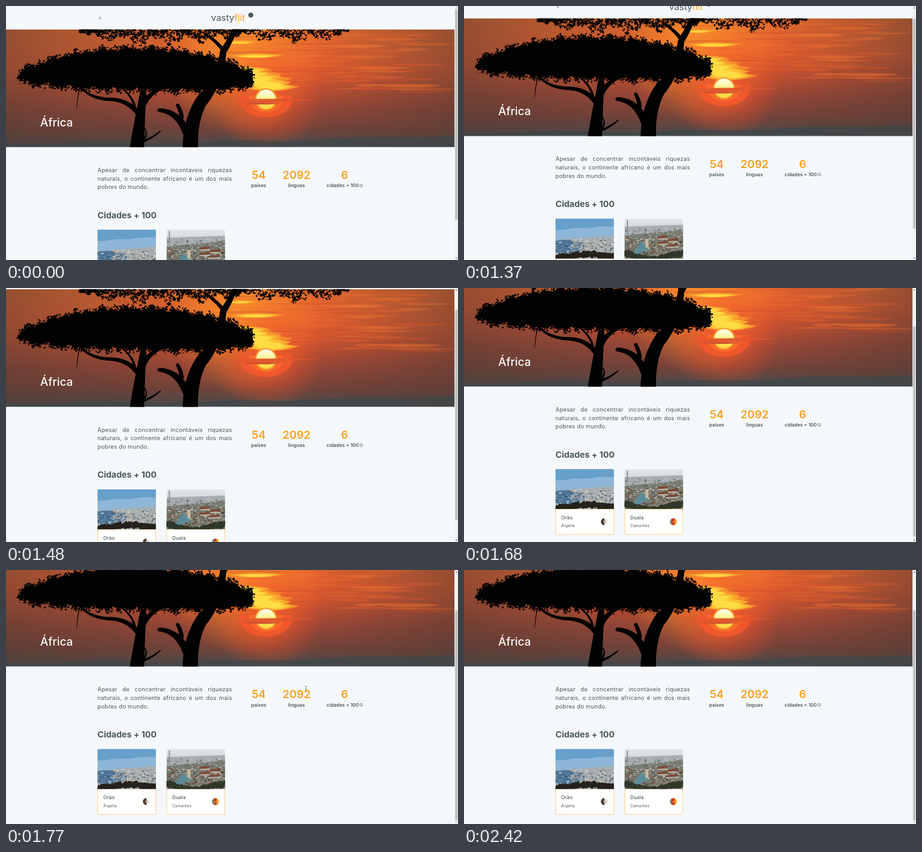
These frames come from a looping animation (998 by 561 pixels, 3.65 s). An HTML page with a canvas:

```html
<!DOCTYPE html>
<html lang="pt">
<head>
<meta charset="utf-8">
<title>África</title>
<style>
  html, body { margin: 0; width: 100%; height: 100%; overflow: hidden; background: #f5f8fb; }
  canvas { display: block; }
</style>
</head>
<body>
<canvas id="stage" width="998" height="561"></canvas>
<script>
const W = 998, H = 561, LOOP = 3650, VIEW = 990.5;
const BG = '#f5f8fb', DARK = '#47585b', GOLD = '#fca11f', INK = '#030202';
const HERO = { y: 51.7, h: 259.8 };
const CARD = { y: 493.8, w: 129, photo: 88.4, h: 144.5 };
const SUN = { x: 574, y: 206, r: 21.3 };
const stage = document.getElementById('stage').getContext('2d');
const layer = document.createElement('canvas');
layer.width = W;
layer.height = 670;
let g = layer.getContext('2d');

let seed = 7;
const rnd = (a = 0, b = 1) => {
  seed = (seed * 16807) % 2147483647;
  return a + (b - a) * seed / 2147483647;
};
const spread = size => size * (rnd() + rnd() - 1);
const pick = list => list[Math.floor(rnd(0, list.length))];

function rect(x, y, w, h, color) {
  g.fillStyle = color;
  g.fillRect(x, y, w, h);
}

function oval(x, y, rx, ry, color, tilt = 0) {
  g.fillStyle = color;
  g.beginPath();
  g.ellipse(x, y, rx, ry, tilt, 0, 7);
  g.fill();
}

const disc = (x, y, r, color) => oval(x, y, r, r, color);

function poly(color, points) {
  g.fillStyle = color;
  g.beginPath();
  for (const [x, y] of points) g.lineTo(x, y);
  g.fill();
}

// Area between two curves of x
function band(color, x0, x1, top, bottom) {
  const points = [];
  for (let x = x0; x <= x1; x += 3) points.push([x, top(x)]);
  for (let x = x1; x >= x0; x -= 3) points.push([x, bottom(x)]);
  poly(color, points);
}

// Lens-shaped wisp of cloud
function wisp(x, y, w, h, color) {
  g.fillStyle = color;
  g.beginPath();
  g.moveTo(x - w / 2, y);
  g.quadraticCurveTo(x - w * 0.1, y - h, x + w / 2, y - h * 0.2);
  g.quadraticCurveTo(x + w * 0.1, y + h, x - w / 2, y);
  g.fill();
}

const leaf = (x, y) => oval(x, y, rnd(0.9, 3.4), rnd(0.7, 2), INK, rnd(-1, 1));

// Tapered branch along a quadratic curve
function limb(w0, w1, x0, y0, cx, cy, x1, y1) {
  for (let u = 0; u <= 1; u += 0.012) {
    const v = 1 - u;
    disc(v * v * x0 + 2 * u * v * cx + u * u * x1, v * v * y0 + 2 * u * v * cy + u * u * y1,
      (w0 + (w1 - w0) * u) / 2, INK);
  }
}

function fade(x0, y0, x1, y1, colors) {
  const f = g.createLinearGradient(x0, y0, x1, y1);
  colors.forEach((c, i) => f.addColorStop(i / (colors.length - 1), c));
  return f;
}

function glow(x, y, r, rgb, alpha) {
  const f = g.createRadialGradient(x, y, 0, x, y, r);
  f.addColorStop(0, `rgba(${rgb},${alpha})`);
  f.addColorStop(1, `rgba(${rgb},0)`);
  rect(x - r, y - r, 2 * r, 2 * r, f);
}

function sky() {
  const { y, h } = HERO;
  rect(0, y, VIEW, h, fade(0, y, 0, y + h,
    ['#e2682d', '#e6642f', '#e05c2f', '#c04f31', '#964637', '#75433a', '#474a4a']));
  const shade = 'rgba(84,60,52,.55)', clear = 'rgba(84,60,52,0)';
  rect(0, y, 450, h, fade(0, 0, 450, 0, [shade, clear]));
  rect(680, y, VIEW - 680, h, fade(680, 0, VIEW, 0, [clear, shade]));
  glow(520, 115, 170, '255,160,40', 0.75);
  glow(SUN.x, SUN.y - 8, 125, '246,84,42', 0.9);

  for (let i = 0; i < 90; i++) {
    const rgb = pick(['240,120,50', '196,76,46', '228,92,44', '246,112,46']);
    wisp(rnd(500, 930), rnd(58, 190), rnd(50, 180), rnd(2, 8), `rgba(${rgb},.32)`);
  }
  // bright clouds gather above the sun
  ['#f58a2c', '#fba62f', '#fec136', '#ffdc42'].forEach((color, k) => {
    for (let i = 0; i < 9; i++) {
      const u = i / 8;
      wisp(525 + 62 * u + spread(12), 142 + 40 * u + spread(5), 125 - 20 * k, 15 - 2 * k, color);
    }
    wisp(552, 110 + k / 2, 130 - 20 * k, 11 - 2 * k, color);
    wisp(516, 80 + k / 2, 90 - 15 * k, 9 - 2 * k, color);
  });
}

function sun() {
  const { x, y, r } = SUN;
  g.save();
  g.beginPath();
  g.rect(0, y - 8, W, 100);
  g.clip();
  oval(x, y, 58, 40, '#f0572b');
  oval(x, y, 38, 29, '#f76a2a');
  g.restore();
  disc(x, y, r + 3, '#fa9a2e');
  disc(x, y, r, fade(0, y - r, 0, y + r, ['#fffdf0', '#fff6ac', '#ffe552', '#ffd93f']));
  for (let i = 0; i < 4; i++) {
    wisp(x + spread(40), y + 1 + i * 3, 190 - i * 34, 3.5, pick(['#e0572d', '#cf4d2e']));
  }
  const ridge = v => 302 - 16 * Math.max(0, (v - 400) / 590) + 2 * Math.sin(v / 45);
  band('rgba(62,72,76,.65)', 0, 993, ridge, () => 312);
}

function fringe(x0, x1, depth, count) {
  for (let i = 0; i < count; i++) {
    const u = rnd(), x = x0 + (x1 - x0) * u;
    const reach = depth * Math.sin(Math.PI * u) ** 0.4 * (0.75 + 0.25 * Math.sin(x / 11) + 0.15 * Math.sin(x / 4));
    leaf(x, HERO.y + reach * rnd() ** 1.2);
  }
}

function trees() {
  const x0 = 28, x1 = 546;
  const arch = (x, p) => Math.max(0, Math.sin(Math.PI * (x - x0) / (x1 - x0))) ** p;
  const ripple = x => 2.5 * Math.sin(x / 9) + 2 * Math.sin(x / 4.3);
  const top = x => 157 - 62 * arch(x, 0.6) + ripple(x);
  const bottom = x => 158 + 20 * arch(x, 0.4) + (x - x0) / 45 + ripple(x * 1.1);
  band(INK, x0, x1, top, bottom);
  for (let i = 0; i < 1700; i++) {
    const x = rnd(x0, x1);
    leaf(x + spread(4), (rnd() < 0.5 ? top(x) : bottom(x)) + spread(11));
  }
  fringe(160, 530, 33, 1100);
  fringe(512, 757, 29, 480);

  // left tree
  limb(32, 14, 289, 316, 294, 260, 303, 192);
  limb(13, 6, 300, 225, 312, 192, 355, 176);
  limb(12, 7, 297, 246, 275, 206, 225, 206);
  limb(7, 4, 225, 206, 185, 203, 163, 178);
  limb(5, 3, 284, 222, 279, 200, 258, 184);
  limb(6, 2, 296, 301, 322, 293, 341, 276);
  limb(3, 1.5, 306, 293, 315, 279, 302, 265);
  limb(2, 1, 163, 180, 158, 200, 156, 226);
  // right tree
  limb(34, 25, 407, 316, 406, 245, 438, 200);
  limb(26, 13, 434, 208, 474, 160, 480, 96);
  limb(14, 10, 480, 100, 496, 75, 508, 46);
  limb(8, 5, 480, 98, 465, 78, 440, 62);
  limb(19, 8, 403, 290, 384, 233, 338, 230);
  limb(9, 7, 388, 246, 386, 232, 379, 219);
}

function photo(x, draw) {
  g.save();
  g.translate(x, CARD.y);
  g.beginPath();
  g.roundRect(0, 0, CARD.w, CARD.photo, [2, 2, 0, 0]);
  g.clip();
  draw();
  g.restore();
}

function specks(n, x0, y0, x1, y1, colors) {
  for (let i = 0; i < n; i++) rect(rnd(x0, x1), rnd(y0, y1), rnd(1, 6), rnd(0.7, 2.5), pick(colors));
}

function bushes(base, color) {
  for (let x = 0; x < CARD.w; x += 0.4) oval(x, base(x) + rnd(0, 12), rnd(1, 4), rnd(1, 4), color);
}

function harbour() {
  rect(0, 0, 129, 89, '#66a0cb');
  band('#8db6d8', 0, 132, x => 25 - x / 15 + Math.sin(x / 9), () => 60);
  band('#a5afb5', 0, 132, x => 47 - x / 14, () => 89);
  oval(22, 62, 42, 15, '#4f7699');
  specks(330, 34, 44, 129, 76, ['#dad6cc', '#b4b5b2', '#8b8f8f', '#5d625f', '#aa9d8c', '#c9c4ba']);
  specks(110, 0, 50, 62, 78, ['#a4b3bf', '#d0d4d5', '#3f617f', '#6c8ba5', '#34506a']);
  bushes(x => 80 - 7 * Math.sin(x / 45) ** 2, '#24221b');
}

function port() {
  rect(0, 0, 129, 89, fade(0, 0, 0, 30, ['#e4e8ea', '#c9d0d4']));
  band('#a6adb1', 0, 132, x => 18 - x / 30, () => 89);
  band('#77796f', 0, 132, x => 38 - x / 9, () => 89);
  specks(150, 0, 20, 129, 45, ['#a4aaab', '#c3c6c4', '#575b54', '#8a8a80']);
  specks(420, 0, 42, 129, 84, ['#6b4535', '#33382c', '#8f5a43', '#b5ac9c', '#4a4d42', '#d3cdc2', '#8e8b80']);
  rect(5, 3, 2.5, 27, '#8a9294');
  for (let i = 0; i < 4; i++) {
    const x = 72 + 22 * (i % 2), y = 40 + 6 * i;
    poly('#7e4735', [[x, y], [x + 22, y - 3], [x + 25, y + 1], [x + 2, y + 5]]);
    rect(x + 2, y + 4, 22, 2.5, '#c6bfb0');
  }
  bushes(x => 78 - 6 * Math.cos(x / 20), '#30382a');
  poly('#5d8c99', [[20, 76], [37, 51], [53, 68], [30, 79]]);
  rect(46, 45, 7, 19, '#c4bba4');
}

function text(s, x, y, size, weight, color, align = 'left', track = 0) {
  g.font = `${weight} ${size}px Inter, "Open Sans", sans-serif`;
  g.letterSpacing = track * size + 'px';
  g.textAlign = align;
  g.fillStyle = color;
  g.fillText(s, x, y);
  return g.measureText(s).width;
}

function paragraph(lines, x, y, width) {
  lines.forEach((line, i) => {
    g.font = '400 12.6px Inter, "Open Sans", sans-serif';
    g.letterSpacing = '0.3px';
    g.wordSpacing = '0px';
    const room = width - g.measureText(line).width;
    if (i < lines.length - 1) g.wordSpacing = room / (line.split(' ').length - 1) + 'px';
    text(line, x, y + i * 18.7, 12.6, 400, DARK, 'left', 0.024);
  });
  g.wordSpacing = '0px';
}

function card(x, city, country) {
  const bodyTop = CARD.y + CARD.photo;
  g.beginPath();
  g.roundRect(x + 0.5, bodyTop, CARD.w - 1, CARD.h - CARD.photo, [0, 0, 2, 2]);
  g.fillStyle = '#fffffd';
  g.fill();
  g.strokeStyle = '#fcc164';
  g.lineWidth = 1;
  g.stroke();
  g.drawImage(layer, x - 1, 490, 131, 92.2, x - 1, 490, 131, 92.2);
  text(city, x + 12.7, 604.7, 10.4, 500, DARK, 'left', 0.03);
  text(country, x + 12.7, 622.1, 8.3, 400, DARK, 'left', 0.04);
}

function flag(x, y, colors, emblem) {
  g.save();
  g.beginPath();
  g.arc(x, y, 7.8, 0, 7);
  g.clip();
  const w = 16 / colors.length;
  colors.forEach((c, i) => rect(x - 8 + i * w, y - 8, w + 0.3, 16, c));
  emblem(x, y);
  g.restore();
}

function star(x, y, r, color) {
  const points = [];
  for (let i = 0; i < 10; i++) {
    const a = i * Math.PI / 5, q = i % 2 ? r * 0.4 : r;
    points.push([x + q * Math.sin(a), y - q * Math.cos(a)]);
  }
  poly(color, points);
}

function header() {
  g.strokeStyle = DARK;
  g.lineWidth = 1.1;
  g.beginPath();
  g.moveTo(208.6, 24.2);
  g.lineTo(206.2, 26.6);
  g.lineTo(208.6, 29);
  g.stroke();
  const w = text('vasty', 453, 33.4, 20, 400, DARK);
  text('flit', 453 + w, 33.4, 20, 400, GOLD);
  disc(540.5, 20, 5.6, DARK);
}

function page() {
  header();
  g.drawImage(layer, 0, 0, W, 480, 0, 0, W, 480);
  text('África', 75.5, 265.6, 25, 500, '#fbfaf8');
  paragraph(['Apesar de concentrar incontáveis riquezas',
    'naturais, o continente africano é um dos mais',
    'pobres do mundo.'], 202, 366.8, 297);

  for (const [n, label, x, lx] of [
    ['54', 'países', 558, 558], ['2092', 'linguas', 641.5, 641.5], ['6', 'cidades + 100', 747.5, 743.5]
  ]) {
    text(n, x, 382, 24.4, 600, GOLD, 'center');
    text(label, lx, 400.2, 10.4, 600, DARK, 'center', 0.008);
  }
  g.strokeStyle = DARK;
  g.lineWidth = 0.8;
  g.beginPath();
  g.arc(784.4, 396.5, 3.3, 0, 7);
  g.stroke();
  rect(784, 396, 0.9, 2.3, DARK);
  rect(784, 394.5, 0.9, 0.9, DARK);

  text('Cidades + 100', 202, 468.6, 18.8, 700, DARK);
  card(202, 'Orão', 'Árgelia');
  card(354.5, 'Duala', 'Camarões');
  flag(310, 610.2, ['#3c4432', '#e9e9e8'], (x, y) => {
    disc(x + 0.3, y, 2.9, '#d5493c');
    disc(x + 1.1, y, 2.3, '#dcdcd8');
    star(x + 1.8, y, 1.6, '#d5493c');
  });
  flag(462.4, 610.2, ['#6f7f70', '#cf3a22', '#f8a427'], (x, y) => star(x, y, 2.2, '#f9c02e'));
}

function scrollbar(offset, settled) {
  const tip = (y, dir, color) => poly(color, [[992.2, y], [994.3, y + 2.4 * dir], [996.4, y]]);
  rect(VIEW, 0, W - VIEW, H, '#f1f1f1');
  rect(991.5, 8 + offset * 0.822 + (settled ? 0.5 : 0), 5.6, 463.6, '#c1c1c1');
  tip(5.2, -1, offset ? '#505050' : '#a3a3a3');
  tip(556, 1, offset > 98 ? '#a3a3a3' : '#505050');
}

function beam(x, y) {
  rect(x - 0.45, y - 4, 0.9, 8, '#4d4f50');
  for (const d of [-4.3, 4.3]) rect(x - 2, y + d - 0.45, 4, 0.9, '#4d4f50');
}

function arrow(x, y) {
  poly('#fff', [[x, y], [x, y + 9], [x + 2, y + 7], [x + 4, y + 10], [x + 4, y + 6.6], [x + 6, y + 6.4]]);
  g.strokeStyle = '#222';
  g.lineWidth = 0.6;
  g.closePath();
  g.stroke();
}

function cursor(t) {
  if (t < 1770 || t >= 2420) return;
  if (t < 2150) return beam(662.3, 261);
  const u = (Math.floor((t - 2150) / 45) + 1) / 6;
  arrow(662 - 656 * u ** 1.3, 261 - 59 * u * u + 12 * Math.sin(Math.PI * u));
}

// [time, page offset]
const SCROLL = [[1770, 98.6], [1680, 94], [1580, 80], [1480, 49.2], [1370, 24.4], [1280, 1.7], [0, 0]];

function render(now) {
  const t = now % LOOP;
  const offset = SCROLL.find(s => t >= s[0])[1];
  rect(0, 0, W, H, BG);
  g.save();
  g.translate(0, -offset);
  page();
  g.restore();
  scrollbar(offset, t >= 1950);
  cursor(t);
  requestAnimationFrame(render);
}

g.save();
g.beginPath();
g.rect(0, HERO.y, VIEW, HERO.h);
g.clip();
sky();
sun();
trees();
g.restore();
photo(202, harbour);
photo(354.5, port);
g = stage;
render(performance.now());
</script>
</body>
</html>
```
